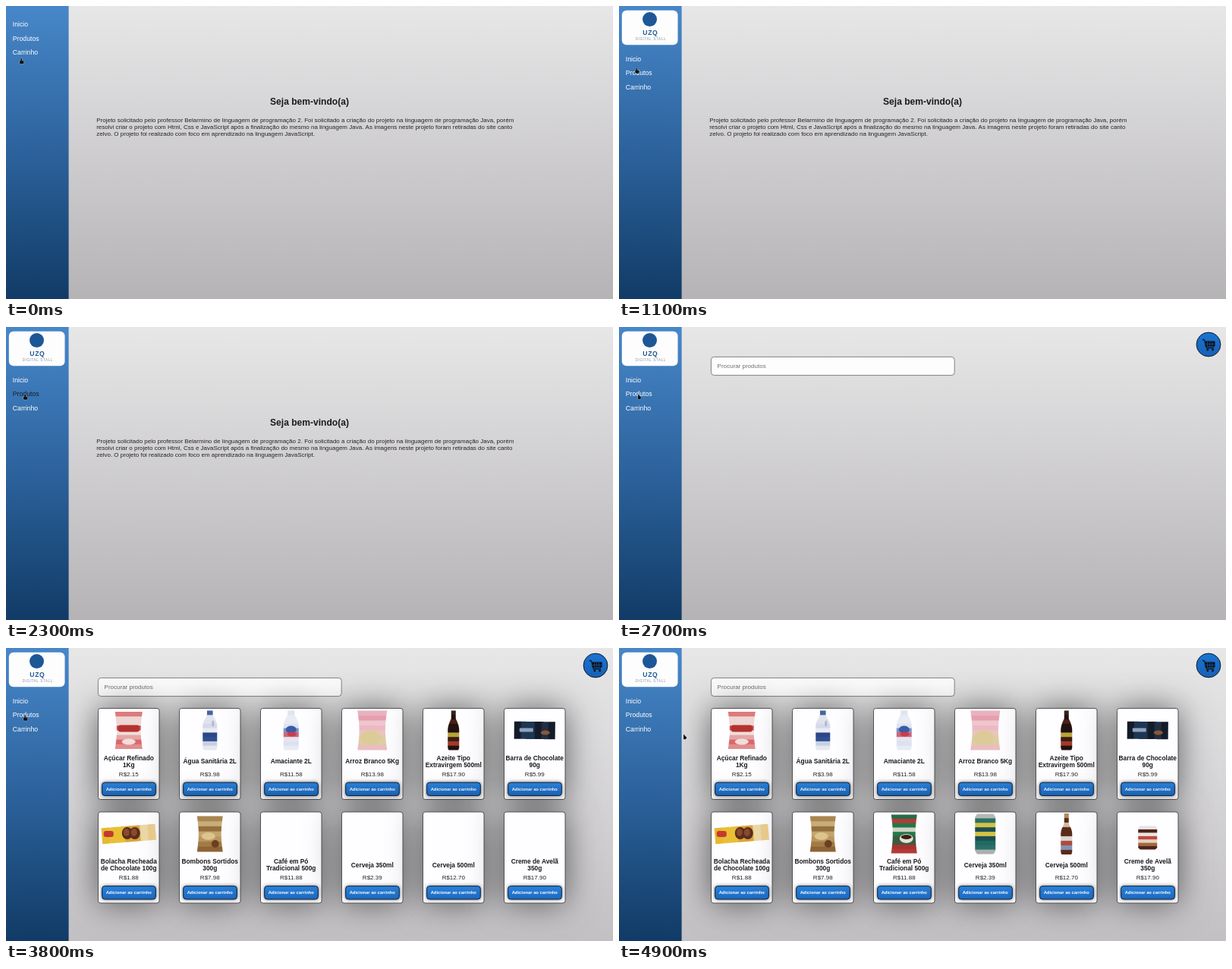
Write an HTML page with a canvas that moves like this. It is 800 px wide and 386 px high and loops after 5000 ms.

```html
<!DOCTYPE html>
<html lang="pt-BR">
<head>
<meta charset="utf-8">
<title>Loja</title>
<style>
html, body { margin: 0; width: 100%; height: 100%; overflow: hidden; background: #ccc; }
canvas { display: block; width: 800px; height: 386px; }
</style>
</head>
<body>
<canvas id="stage" width="800" height="386"></canvas>
<script>
const W = 800, H = 386, LOOP = 5000, STEP = 100;
const LOGO_AT = 300, HOVER_AT = 1300, SHOP_AT = 2600, CARDS_AT = 2800, PHOTOS_AT = 3100;
const CARD_W = 80.5, CARD_H = 120, MID = CARD_W / 2;
const SANS = '"Liberation Sans", Arial, sans-serif';
const INK = '#1b1a1c';
let g = document.getElementById('stage').getContext('2d');

// Drawing helpers
function fade(y0, y1, ...colors) {
  const f = g.createLinearGradient(0, y0, 0, y1);
  colors.forEach((c, i) => f.addColorStop(i / (colors.length - 1), c));
  return f;
}
function bands(y0, y1, colors) {
  const f = g.createLinearGradient(0, y0, 0, y1);
  colors.forEach((c, i) => {
    f.addColorStop((i + 0.1) / colors.length, c);
    f.addColorStop((i + 0.9) / colors.length, c);
  });
  return f;
}
function rect(fill, x, y, w, h, r = 0) {
  g.fillStyle = fill;
  g.beginPath();
  g.roundRect(x, y, w, h, r);
  g.fill();
}
function outline(color, width) {
  g.strokeStyle = color;
  g.lineWidth = width;
  g.stroke();
}
function oval(fill, x, y, rx, ry = rx) {
  g.fillStyle = fill;
  g.beginPath();
  g.ellipse(x, y, rx, ry, 0, 0, 7);
  g.fill();
}
function text(s, x, y, size, color = INK, weight = '', align = 'left') {
  g.font = `${weight} ${size}px ${SANS}`;
  g.fillStyle = color;
  g.textAlign = align;
  g.fillText(s, x, y);
}
function at(x, y, draw, turn = 0) {
  g.save();
  g.translate(x, y);
  g.rotate(turn);
  draw();
  g.restore();
}
function shaded(color, blur, draw) {
  g.save();
  g.shadowColor = color;
  g.shadowBlur = blur;
  draw();
  g.restore();
}
function layer(draw) {
  const c = document.createElement('canvas');
  c.width = W;
  c.height = H;
  const back = g;
  g = c.getContext('2d');
  draw();
  g = back;
  return c;
}
const ramp = (t, a, b) => Math.min(1, Math.max(0, (t - a) / (b - a)));

// Package outlines: half width along the height, u from 0 to 1
const bag = u => 1 - 0.12 * Math.sin(Math.PI * u);
const can = u => 1 - 0.2 * ramp(Math.abs(u - 0.5), 0.42, 0.5);
const bar = () => 1;
const bottle = (neck, from, to) => u =>
  neck + (1 - neck) * Math.sin(ramp(u, from, to) * Math.PI / 2) - 0.15 * ramp(u, 0.95, 1);

function pack(shape, w, h, colors) {
  const n = 30;
  g.beginPath();
  for (let i = 0; i <= 2 * n + 1; i++) {
    const right = i <= n;
    const u = (right ? i : 2 * n + 1 - i) / n;
    g.lineTo((right ? 1 : -1) * shape(u) * w / 2, (u - 0.5) * h);
  }
  g.fillStyle = bands(-h / 2, h / 2, colors);
  g.fill();
}
const lying = (w, h, tilt, colors) =>
  at(0, 0, () => pack(bar, h, w, colors), -Math.PI / 2 - tilt);

// Title, price, picture drawn around its centre
const products = [
  ['Açúcar Refinado|1Kg', '2.15', () => {
    pack(bag, 36, 49, ['#dd7a7c', '#eed6d3', '#eed6d3', '#d3474a', '#f0dedb', '#e5a5a5', '#d9686b', '#e08d8d']);
    rect('#b3322f', -14, -7, 28, 9, 3);
    oval('#f1dedb', 0, 15, 9, 4);
  }],
  ['Água Sanitária 2L', '3.98', () => {
    pack(bottle(0.4, 0.12, 0.4), 19, 52, ['#47639f', '#e2e5ee', '#dfe3ee', '#d5daea', '#e9ebf4', '#2c4787', '#31508f', '#c9d0e2', '#e6e8f0']);
    oval('#aeb8d0', 4, -9, 1.5, 4);
  }],
  ['Amaciante 2L', '11.58', () => {
    pack(bottle(0.45, 0.1, 0.4), 20, 52, ['#dfe4f0', '#e9ecf5', '#e9ecf5', '#dfe4f1', '#7d92c4', '#cf6677', '#e6e6f0', '#dce1ef', '#e9ebf4']);
    oval('#3a5ba5', 0, -1, 7, 5);
    oval('#cb3c4c', 1, 5, 6, 3);
  }],
  ['Arroz Branco 5Kg', '13.98', () => {
    pack(bag, 39, 52, ['#e9b3be', '#e59fae', '#efc6cd', '#ecb9c3', '#e9c5bd', '#dfcba4', '#dfcba4', '#eabcc2']);
    oval('#dccb98', -2, 10, 13, 10);
  }],
  ['Azeite Tipo|Extravirgem 500ml', '17.90', () => {
    pack(bottle(0.4, 0.2, 0.5), 15, 52, ['#352018', '#21110f', '#4a2019', '#21110f', '#21110f', '#bba339', '#3a1d16', '#a3392a', '#21110f']);
  }],
  ['Barra de Chocolate|90g', '5.99', () => {
    lying(54, 23, -0.01, ['#131b28', '#1d3652', '#1d3652', '#141c2a', '#202f44', '#141c2a']);
    rect('#8ea3bf', -20, -3, 18, 5, 1);
    oval('#8a5638', 14, 3, 6, 3);
  }],
  ['Bolacha Recheada|de Chocolate 100g', '1.88', () => {
    lying(71, 21, 0.08, ['#e6b92f', '#e9bf35', '#e9bf35', '#d9a437', '#d9a437', '#ead7a6', '#e6c98c']);
    rect('#c5392f', -33, -4, 13, 8, 3);
    for (const x of [-2, 8]) {
      oval('#5b2c1d', x, -1, 7, 8);
      oval('#8a4a2d', x - 1, -2, 4, 5);
    }
  }],
  ['Bombons Sortidos|300g', '7.98', () => {
    pack(bag, 34, 47, ['#a98551', '#c9ad76', '#94703f', '#c3a46b', '#b8965e', '#a37a45', '#8e6436']);
    oval('#dcc48f', -2, 3, 9, 5);
    oval('#6b3f22', 7, 13, 5);
  }],
  ['Café em Pó|Tradicional 500g', '11.88', () => {
    pack(bag, 34, 51, ['#2a6b47', '#b23b37', '#23774a', '#d0d2c2', '#23774a', '#3d5a3e', '#3d5a3e', '#a8332f', '#b23b37']);
    oval('#e6e1d4', 3, 6, 9, 6);
    oval('#3d1f16', 3, 4, 7, 3);
  }],
  ['Cerveja 350ml', '2.39', () => {
    pack(can, 27, 53, ['#b4b9b5', '#2b7068', '#d2c245', '#1b4d55', '#d2c245', '#1b4d55', '#23695f', '#2b7068', '#aab0ad']);
  }],
  ['Cerveja 500ml', '12.70', () => {
    pack(bottle(0.4, 0.25, 0.5), 15, 54, ['#b08a5c', '#5a2b17', '#cdbca2', '#5a2b17', '#5a2b17', '#dcd8d2', '#ad4a3c', '#8493b3', '#5a2b17']);
  }],
  ['Creme de Avelã|350g', '17.90', () => at(0, 5, () => {
    pack(can, 25, 31, ['#e6e3e2', '#4c251a', '#ebe5df', '#c0483e', '#e2d2c1', '#a2663f', '#4c251a']);
  })]
];
const cardX = i => 121.5 + i % 6 * 107;
const cardY = i => 79.5 + Math.floor(i / 6) * 136.5;
// Photos come in one by one, the last ones more slowly
const photoAt = i => PHOTOS_AT + i * 100 + Math.max(0, i - 7) * 150;

function card([title, price], i) {
  const lines = title.split('|');
  at(cardX(i), cardY(i), () => {
    shaded('rgba(0,0,0,.58)', 44, () => rect('#fefdff', 0, 0, CARD_W, CARD_H, 3));
    outline('#454446', 0.9);
    lines.forEach((s, k) =>
      text(s, MID, 72.6 + (k - (lines.length - 1) / 2) * 9.2, 8.33, INK, 'bold', 'center'));
    text('R$' + price, MID, 89.2, 8, '#232224', '', 'center');
    const button = () => rect(fade(97, 115, '#2b82da', '#1c69c0'), 5.2, 97.7, 70.6, 17.3, 3.5);
    shaded('rgba(0,0,0,.7)', 5, button);
    button();
    outline('#10243c', 1);
    text('Adicionar ao carrinho', MID, 108.1, 5.83, '#fff', 'bold', 'center');
  });
}

function page(bottom) {
  rect(fade(0, H, '#e8e7e8', bottom), 0, 0, W, H);
}
function sidebar() {
  rect(fade(0, H, '#4787c9', '#2c629c', '#113b66'), 0, 0, 82.6, H);
}
function cartButton() {
  const ink = '#0c1118', blue = '#1b67bd';
  oval(fade(7, 39, '#1a75d4', '#1860b4'), 777, 23, 15.9);
  outline('#0d1a2a', 1);
  g.beginPath();
  g.moveTo(769, 16.5);
  g.lineTo(771.5, 17);
  g.lineTo(774.5, 27.5);
  g.lineTo(784, 27.5);
  outline(ink, 1.3);
  rect(ink, 772.5, 18.5, 13, 7.3, 1);
  for (let x = 775.5; x < 783; x += 3) rect(blue, x, 19, 0.6, 6.5);
  rect(blue, 773, 22, 12, 0.6);
  for (const x of [775.8, 782.6]) oval(ink, x, 30, 1.4);
}
function search() {
  rect('#fdfdfd', 121.4, 39.4, 320.8, 24.2, 4);
  outline('#777679', 0.9);
  text('Procurar produtos', 129.6, 54, 8, '#706f72');
}

const home = layer(() => {
  page('#b5b3b6');
  text('Seja bem-vindo(a)', 400, 130.3, 12.07, INK, 'bold', 'center');
  [
    'Projeto solicitado pelo professor Belarmino de linguagem de programação 2. Foi solicitado a criação do projeto na linguagem de programação Java, porém',
    'resolvi criar o projeto com Html, Css e JavaScript após a finalização do mesmo na linguagem Java. As imagens neste projeto foram retiradas do site canto',
    'zelvo. O projeto foi realizado com foco em aprendizado na linguagem JavaScript.'
  ].forEach((s, i) => text(s, 119.2, 152.6 + i * 9.2, 8.01, '#242325'));
  sidebar();
});
const empty = layer(() => {
  page('#b5b3b6');
  search();
  cartButton();
  sidebar();
});
const shop = layer(() => {
  page('#c2c0c3');
  search();
  products.forEach(card);
  cartButton();
  sidebar();
});

function logo() {
  rect('#fdfdfe', 3.8, 5.8, 73.7, 45.5, 6);
  oval('#1d5796', 40.5, 17.5, 9.5);
  g.letterSpacing = '0.6px';
  text('UZQ', 41.3, 38.2, 8.6, '#1d5796', 'bold', 'center');
  text('DIGITAL STALL', 41.8, 45.4, 4.6, '#8793a3', '', 'center');
  g.letterSpacing = '0px';
}
function menu(top, hover) {
  ['Inicio', 'Produtos', 'Carrinho'].forEach((s, i) =>
    text(s, 8.8, top + i * 18.4, 8.7, hover && i === 1 ? '#16202c' : '#fff'));
}

function arrow() {
  g.beginPath();
  g.moveTo(0, 0);
  g.lineTo(0, 6.5);
  g.lineTo(2.6, 7);
  g.lineTo(4.4, 4.4);
  g.closePath();
  outline('rgba(255,255,255,.6)', 0.8);
  g.fillStyle = '#111';
  g.fill();
}
function hand() {
  g.beginPath();
  g.roundRect(-0.7, 0, 1.6, 4.5, 0.8);
  g.roundRect(-2, 3, 5.4, 4.3, 1.4);
  outline('rgba(255,255,255,.6)', 0.8);
  g.fillStyle = '#111';
  g.fill();
}
function pointer(t) {
  const toLink = 1 - (1 - ramp(t, 900, 1400)) ** 2;
  const leave = ramp(t, 4600, 4800), dash = ramp(t, 4800, 4900);
  const isArrow = t >= SHOP_AT && t < PHOTOS_AT || t >= 4800;
  at(20 + 5 * toLink + 7 * leave + 53 * dash,
     69 + 19.5 * toLink + 15 * leave + 10 * dash, isArrow ? arrow : hand);
}

function frame() {
  const t = Math.floor(performance.now() % LOOP / STEP) * STEP;
  g.drawImage(t < SHOP_AT ? home : t < CARDS_AT ? empty : shop, 0, 0);
  products.forEach(([, , picture], i) => {
    if (t >= photoAt(i)) at(cardX(i) + MID, cardY(i) + 29, picture);
  });
  const loaded = t >= LOGO_AT;
  if (loaded) logo();
  menu(loaded ? 72.9 : 27.2, t >= HOVER_AT && t < SHOP_AT);
  pointer(t);
  requestAnimationFrame(frame);
}
requestAnimationFrame(frame);
</script>
</body>
</html>
```
